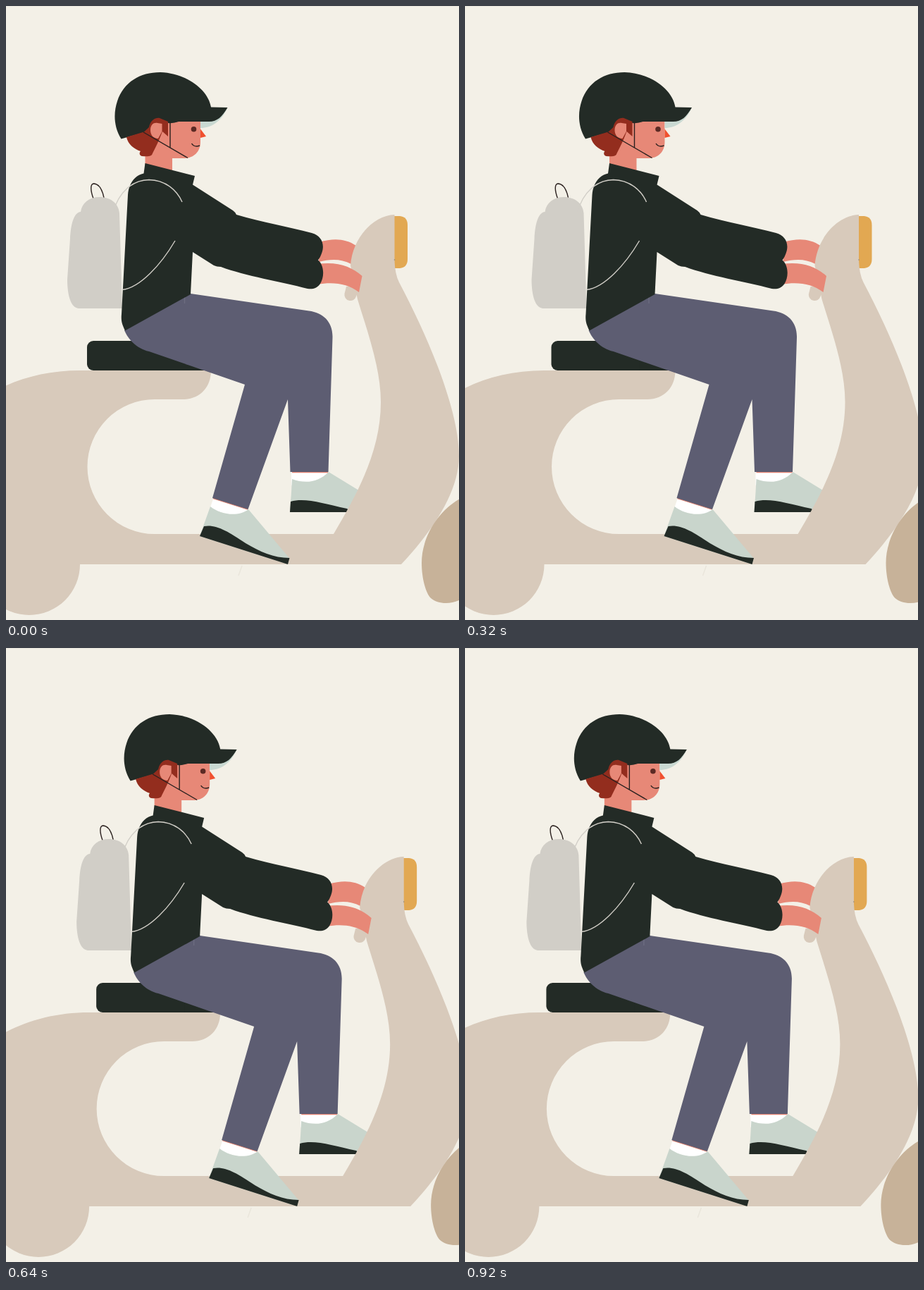
Animation, 643 px wide and 871 px high, one loop 960 ms. Source, as an HTML page:

```html
<!DOCTYPE html>
<html lang="en">
<head>
<meta charset="utf-8">
<title>Scooter rider</title>
<style>
html, body { margin: 0; width: 100%; height: 100%; overflow: hidden; background: #f3f0e7; }
svg { display: block; width: 100vw; height: 100vh; }
.dark { fill: #232b26; }
.body { fill: #d8cabb; }
.pants { fill: #5d5d72; }
.skin { fill: #e78877; }
.hair { fill: #932d1e; }
.bag { fill: #d1cec7; }
.shoe { fill: #c9d5cc; }
.sock { fill: #fff; }
.line { fill: none; stroke-width: 1.4; }
.ink { stroke: #2b211f; }
.strap { stroke: #d1cec7; }
.cuff { stroke: #e78877; }
</style>
</head>
<body>
<svg viewBox="0 0 643 871">
  <rect width="643" height="871" fill="#f3f0e7"/>
  <rect width="643" height="1" fill="#ebe8df"/>
  <g id="ride">
    <!-- far foot and hand -->
    <path class="sock" d="M405 661H458L445 680H405Z"/>
    <path class="shoe" d="M406 671C425 678 443 676 458 661L512 694V718H403L405 690Z"/>
    <path class="dark" d="M404 703C425 697 450 706 484 713L490 718H403Z"/>
    <path class="skin" d="M445 335C465 329 482 330 497 340L490 366C475 358 460 359 444 363Z"/>

    <!-- scooter -->
    <path fill="#e2a852" d="M551 298H559Q570 299 570 311V359Q570 371 559 372H551Z"/>
    <path class="body" d="M483 398L480.500 408A8.500 8.500 0 0 0 497 412L503 395Z"/>
    <path class="body" d="M-45 565C-5 535 45 517 105 517H291C291 541 275 558 251 558H211A95.500 95.500 0 0 0 211 749H465C500 690 532 630 532 562C532 515 514 465 499 416L489 368C492 328 522 297 551.500 296V361Q552 380 558 392C602 475 643 575 643 638C643 690 605 745 561 792H105A72 72 0 0 1 -39 792Z"/>
    <path fill="#c7b299" d="M665 691C625 700 590 745 590 790C590 812 596 833 603 840C612 848 630 850 645 842L665 832Z"/>
    <circle cx="551.500" cy="360" r="0.800" fill="#8d867d"/>
    <rect class="dark" x="115" y="475" width="168" height="42" rx="9"/>
    <path class="dark" d="M240 490H283V517H240Z"/>
    <path class="line" stroke="#e9e5db" d="M335 794L330 808"/>

    <!-- backpack -->
    <path class="line ink" d="M124 273C120 262 119 252 125 252C133 253 137 262 139 272"/>
    <path class="bag" d="M103 429C92 428 87 410 87 388L91 330C92 310 96 293 106 292C108 279 118 271 133 271C148 271 160 280 161 294L165 429Z"/>

    <!-- legs -->
    <path class="line cuff" d="M406 661.500H457M294 698.500L343 714"/>
    <path class="pants" d="M262 408L430 432.500C450 435 464 448 463.500 470L457.500 661H403.500L400 558L343.500 714L293 698L339 537L203 490C185 486 173 472 168 460Z"/>
    <path class="line" stroke="#77778a" d="M253.500 412V422" opacity=".6"/>
    <path class="sock" d="M294 699.500L343 715L335 726L289 714Z"/>
    <path class="shoe" d="M290 710C305 722 330 725 344 714L402 783L400 792L275 752Z"/>
    <path class="dark" d="M281 738C298 735 315 745 340 762C360 774 380 783 402.500 783L400 792L275 752Z"/>

    <!-- near hand -->
    <path class="skin" d="M442 366C470 362 490 369 505.500 383L501 406C485 394 465 391 442 395Z"/>

    <!-- head -->
    <path class="skin" d="M197.500 200H236V236L197.500 230Z"/>
    <path class="skin" d="M205 160H276V193C276 207 266 216 253 216H198V200Z"/>
    <path fill="#c9d9d2" d="M276 162V173C292 173 306 163 314 145Z"/>
    <path fill="#f0502f" d="M276 174.500L284 185L276 187Z"/>
    <path class="dark" d="M163.500 188.500C152 170 153 150 158 135C167 108 190 94 219 94C255 95 287 118 291 143.500L314.500 144C307 157 300 164 288 164H247C242 164 239 167 230 166L201 178Z"/>
    <path class="hair" d="M171 186L196 178.500L203 172C205 162 212 158 218 159L230 164V185L222 178C219 186 217 191 213 199L208 209C207 213 203 214 193 213C189 212 189 208 191 206C182 203 173 196 171 186Z"/>
    <path class="skin" d="M205 176C205 168 210 165 215 166L221.500 167V178L216 188C209 188 205 183 205 176Z"/>
    <circle cx="266.500" cy="174.800" r="3.800" fill="#5b2a24"/>
    <path class="line ink" d="M263.500 195C266 199 270 200 275 198M195 179L258 215.500M233 164V201.500"/>

    <!-- jacket -->
    <path class="dark" d="M197.500 223L268 241L265 253.500L322 290Q325 292 327 296C365 307 400 313 434 322C448 326 453 338 448 351Q446 357 443 360.500C452 368 452 385 446 394C441 401 435 402 428 401C390 391 340 383 305 370Q299 370 295 368L265 349L262 409L169 460.500C165 452 163 447 164 437L173 268C174 252 183 240 195.500 237.500Z"/>
    <path class="line strap" d="M152 293C160 263 180 247 203 246.500C227 247 243 262 250 278M165 402.500C190 400 220 367 240 333"/>
  </g>
</svg>
<script>
const ride = document.getElementById('ride');
const LOOP = 960, STEP = 40, PEAK = 600, REACH = 13.6;
const ease = u => (1 - Math.cos(Math.PI * u)) / 2;

// Slow glide forward, quicker return.
function shift(t) {
  if (t <= PEAK) return REACH * ease(t / PEAK);
  const s = (t - PEAK) / (LOOP - PEAK);
  return REACH * (1 - ease(s + 0.045 * Math.sin(Math.PI * s) ** 2));
}

function draw(now) {
  const t = Math.floor((now % LOOP) / STEP) * STEP;
  ride.setAttribute('transform', `translate(${shift(t).toFixed(2)} 0)`);
}

const start = performance.now();
function tick() {
  draw(performance.now() - start);
  requestAnimationFrame(tick);
}
tick();
</script>
</body>
</html>
```
